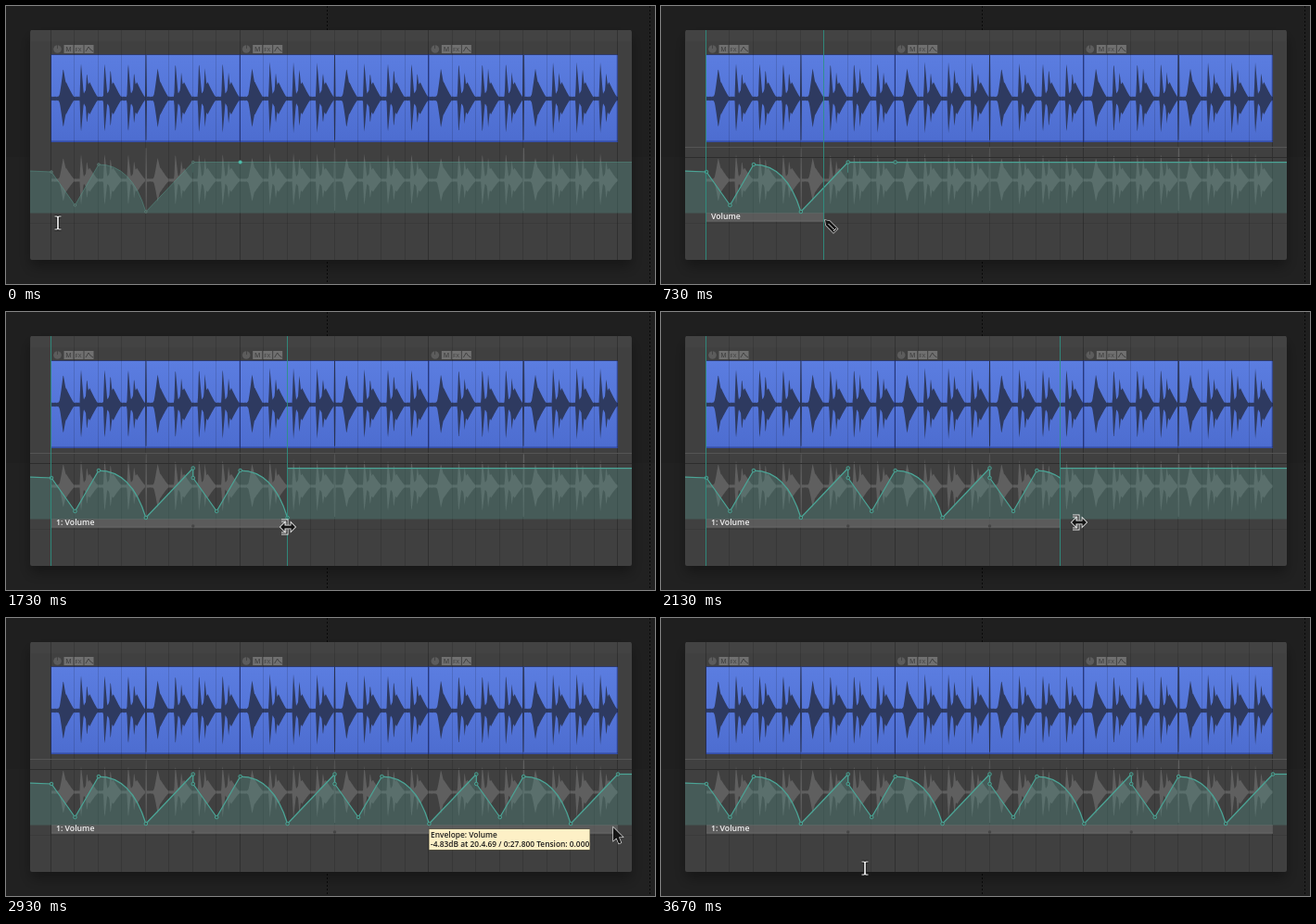
An HTML page with a canvas that plays this animation: 700 by 300 pixels, repeating every 4070 ms.

```html
<!DOCTYPE html>
<html lang="en">
<head>
<meta charset="utf-8">
<title>Automation item loop</title>
<style>
html, body { margin: 0; width: 100%; height: 100%; overflow: hidden; background: #202020; }
canvas { display: block; width: 700px; height: 300px; }
</style>
</head>
<body>
<canvas id="stage" width="700" height="300"></canvas>
<script>
const ctx = document.getElementById('stage').getContext('2d');
const LOOP = 4070, STEP = 1000 / 15;
const PANEL = { left: 26, top: 26, right: 675, bottom: 274 };
const START = 49, GRID = 25.46, ITEM = GRID * 8, CYCLE = GRID * 6, END = START + GRID * 24;
const BASE_Y = 168.5, FLOOR_Y = 223.5;
const TEAL = '#4aab9b';
const FONT = '"Open Sans", "Noto Sans", sans-serif';

// Pointer key points: time, x, y
const pointerPath = [
  [0, 56, 234], [600, 52, 232], [730, 177, 231], [870, 203, 231], [1200, 199, 229], [1530, 199, 230],
  [1730, 304, 232], [2130, 451, 227], [2670, 657, 227], [2930, 655, 226], [3400, 318, 268], [3670, 220, 270]
];

function pointerAt(t) {
  const next = pointerPath.findIndex(key => key[0] > t);
  if (next < 0) return pointerPath[pointerPath.length - 1].slice(1);
  const [t0, x0, y0] = pointerPath[next - 1], [t1, x1, y1] = pointerPath[next];
  const p = (t - t0) / (t1 - t0);
  return [x0 + (x1 - x0) * p, y0 + (y1 - y0) * p];
}

// The item's right edge follows the dragging pointer, snapped to the grid.
function itemEdge(t) {
  const [x] = pointerAt(Math.min(t, 2670));
  return START + GRID * Math.floor((x - START) / GRID + 0.15);
}

function rect(x, y, w, h, color) {
  ctx.fillStyle = color;
  ctx.fillRect(x, y, w, h);
}

function vline(x, top, bottom, color) {
  rect(Math.round(x) - 1, top, 1, bottom - top, color);
}

function dot(x, y, r, color) {
  ctx.beginPath();
  ctx.arc(x, y, r, 0, 7);
  ctx.fillStyle = color;
  ctx.fill();
}

function text(str, x, y, size, color) {
  ctx.font = `600 ${size}px ${FONT}`;
  ctx.fillStyle = color;
  ctx.fillText(str, x, y);
}

function polyline(points, { fill, stroke, width = 1, close = false }) {
  ctx.beginPath();
  points.forEach(([x, y]) => ctx.lineTo(x, y));
  if (close) ctx.closePath();
  ctx.lineWidth = width;
  ctx.strokeStyle = stroke;
  ctx.stroke();
  if (fill) {
    ctx.fillStyle = fill;
    ctx.fill();
  }
}

function clipped(left, right, draw) {
  ctx.save();
  ctx.beginPath();
  ctx.rect(left, 0, right - left, 300);
  ctx.clip();
  draw();
  ctx.restore();
}

// Each beat has a thin spike on its second quarter and a concave body on its third.
function amplitude(x) {
  const u = x % GRID, beat = Math.floor(x / GRID) % 4;
  const pulse = (at, height, rise, fall, bend) => {
    const d = u - at;
    return height * Math.max(0, 1 - (d < 0 ? -d / rise : d / fall)) ** bend;
  };
  const spike = beat ? pulse(GRID / 4, 40, 1.4, 3.4, 1) : 0;
  const peak = pulse(GRID / 2, 33 - beat % 2 * 4, beat ? 2 : 5, beat ? 4 : 7, 1.3);
  const body = pulse(GRID * 0.62, 18, 10, 10, 1.2);
  const accent = Math.abs(x % ITEM - ITEM / 2) < 0.8 ? 47 : 0;
  return Math.max(1.5 + Math.abs(Math.sin(x * 2.3)), spike, peak, body, accent);
}

function waveform(centre, scale, color) {
  const width = END - START;
  ctx.beginPath();
  for (let x = 0; x <= width; x += 0.5) ctx.lineTo(START + x, centre - amplitude(x) * scale);
  for (let x = width; x >= 0; x -= 0.5) ctx.lineTo(START + x, centre + amplitude(x) * scale * 0.95);
  ctx.fillStyle = color;
  ctx.fill();
}

function itemHeader(x) {
  dot(x + 6.5, 46.5, 4.3, '#5c5c5c');
  vline(x + 7, 42, 46, '#444');
  for (let i = 0; i < 3; i++) rect(x + 13.5 + i * 11, 42, 10, 9, '#707070');
  text('M', x + 15.3, 49.3, 7, '#424242');
  text('FX', x + 25.6, 49, 6, '#484848');
  polyline([[x + 37, 49], [x + 40, 44], [x + 42, 47], [x + 45, 49]], { stroke: '#424242' });
}

function drawBackdrop() {
  rect(0, 0, 700, 300, '#212121');
  rect(0, 0, 700, 163, '#1f1f1f');
  ctx.setLineDash([2, 2]);
  for (const x of [346.5, 694.5]) polyline([[x, 0], [x, 300]], { stroke: '#090909' });
  ctx.setLineDash([]);
  ctx.save();
  ctx.shadowColor = 'rgba(0,0,0,.3)';
  ctx.shadowBlur = 14;
  ctx.shadowOffsetY = 8;
  ctx.beginPath();
  ctx.roundRect(PANEL.left, PANEL.top, PANEL.right - PANEL.left, PANEL.bottom - PANEL.top, 2);
  ctx.fillStyle = '#404040';
  ctx.fill();
  ctx.restore();
  rect(27, 26, 647, 12, '#434343');
  rect(26, 234, 649, 1, '#3a3a3a');
}

function drawItems() {
  const blue = ctx.createLinearGradient(0, 53, 0, 147);
  blue.addColorStop(0, '#5b7de0');
  blue.addColorStop(1, '#4d6dd0');
  rect(START, 53, END - START, 94, blue);
  waveform(100, 1, '#2e3a60');
  for (let x = START; x < END - 1; x += ITEM) {
    itemHeader(x);
    ctx.strokeStyle = 'rgba(38,58,140,.6)';
    ctx.lineWidth = 1;
    ctx.strokeRect(Math.round(x) - 0.5, 52.5, ITEM, 94);
    rect(x, 145, ITEM, 1, 'rgba(38,58,140,.4)');
  }
  waveform(188, 0.74, '#5f5f5f');
}

function drawGrid() {
  for (let i = 0; i <= 24; i++) {
    vline(START + i * GRID, PANEL.top, PANEL.bottom, i % 8 ? 'rgba(0,0,0,.13)' : 'rgba(0,0,0,.24)');
  }
}

const corners = [[0, 179], [1, 215], [2, 171], [4, 222], [6, BASE_Y]];

function traceCycle(x) {
  corners.forEach(([units, y]) => {
    if (units === 4) ctx.quadraticCurveTo(x + GRID * 3.4, 171, x + GRID * 4, y);
    else ctx.lineTo(x + units * GRID, y);
  });
}

function strokeAndFill(trace, left, right, lit) {
  clipped(left, right, () => {
    ctx.beginPath();
    trace();
    ctx.lineWidth = lit ? 1.25 : 0.7;
    ctx.strokeStyle = lit ? TEAL : 'rgba(90,165,150,.65)';
    ctx.lineJoin = 'round';
    ctx.stroke();
    ctx.lineTo(right, FLOOR_Y);
    ctx.lineTo(left, FLOOR_Y);
    ctx.fillStyle = 'rgba(80,140,130,.36)';
    ctx.fill();
  });
}

function node(x, y, lit, selected) {
  dot(x, y, lit || selected ? 1.8 : 1.3, selected ? '#4fc0ae' : '#40554f');
  ctx.lineWidth = lit ? 0.9 : 0.6;
  ctx.strokeStyle = lit || selected ? TEAL : '#6a8f88';
  ctx.stroke();
}

function drawEnvelope(edge, lit) {
  const end = Math.max(edge, START + CYCLE);
  strokeAndFill(() => {
    ctx.moveTo(PANEL.left, 178);
    for (let x = START; x < END - 1; x += CYCLE) traceCycle(x);
    ctx.lineTo(PANEL.right, BASE_Y);
    ctx.lineTo(PANEL.right, FLOOR_Y);
  }, PANEL.left, end, lit);
  strokeAndFill(() => {
    ctx.moveTo(end, BASE_Y);
    ctx.lineTo(PANEL.right, BASE_Y);
  }, end, PANEL.right, lit);
  for (let x = START; x < end - 1; x += CYCLE) {
    for (const [units, y] of corners) {
      if (x + units * GRID <= end + 0.1) node(x + units * GRID, y, lit);
    }
  }
  if (end < START + ITEM - 1) node(START + ITEM, BASE_Y, lit, !lit);
}

function drawAutomationItem(edge, label) {
  if (edge <= START) return;
  rect(START, 223, edge - START, 9.5, 'rgba(108,108,108,.62)');
  rect(START, 231.5, edge - START, 1, '#666');
  for (let x = START + CYCLE; x < edge - 1; x += CYCLE) dot(x, 231, 1.7, '#454545');
  clipped(START, edge, () => text(label, 54, 230, 8.7, '#f2f2f2'));
}

function tooltip(x, y, detail) {
  rect(x - 0.5, y - 0.5, 174, 23, '#5e583f');
  rect(x, y, 173, 22, '#fdf0c6');
  text('Envelope: Volume', x + 1.5, y + 9, 8.4, '#1c1c1c');
  text(detail, x + 1.5, y + 19, 8.4, '#1c1c1c');
}

const cursors = {
  beam() {
    for (const [stroke, width] of [['#1b1b1b', 3], ['#f0f0f0', 1.2]]) {
      for (const side of [-1, 1]) {
        polyline([[3.5 * side, -7], [side, -7], [0, -6], [0, 6], [side, 7], [3.5 * side, 7]], { stroke, width });
      }
    }
  },
  pencil() {
    polyline([[0, 0], [5, 1], [13.5, 9.5], [9, 14], [0.8, 5.5]],
      { fill: '#141414', stroke: '#f0f0f0', width: 1.2, close: true });
    polyline([[3.5, 4], [10, 10.5]], { stroke: '#eee' });
    polyline([[9, 12], [12, 9]], { stroke: '#eee' });
  },
  resize() {
    const bracket = [[-7, -7], [-1, -7], [-1, 7], [-7, 7]];
    polyline(bracket, { stroke: '#eee', width: 3 });
    polyline(bracket, { stroke: '#141414', width: 1.2 });
    const half = [[-8, 0], [-3.5, -4.5], [-3.5, -1.5]];
    const top = [...half, ...half.map(([x, y]) => [-x, y]).reverse()];
    const bottom = top.map(([x, y]) => [x, -y]).reverse();
    polyline([...top, ...bottom], { fill: '#141414', stroke: '#f0f0f0', width: 1.6, close: true });
  },
  arrow() {
    polyline([[0, 0], [0, 14.5], [3.4, 11.5], [6, 17.5], [8.5, 16.4], [6, 10.5], [10.3, 10.3]],
      { fill: '#151515', stroke: '#eee', width: 1.2, close: true });
  }
};

function cursorName(t) {
  if (t < 270) return 'beam';
  if (t < 1130) return 'pencil';
  if (t < 2730) return 'resize';
  return t < 3070 ? 'arrow' : 'beam';
}

function render(t) {
  const lit = t >= 200;
  const drawing = t >= 600 && t < 1130;
  const resizing = t >= 1400 && t < 2930;
  const edge = itemEdge(t);

  drawBackdrop();
  drawItems();
  drawGrid();
  if (t >= 600) rect(26, 152, 649, 1, '#555');
  if (lit) rect(26, 163, 649, 1, '#2d2d2d');
  drawAutomationItem(edge, t < 1130 ? 'Volume' : '1: Volume');
  drawEnvelope(edge, lit);
  if (drawing || resizing) {
    for (const x of [START, edge]) vline(x, PANEL.top, PANEL.bottom, 'rgba(48,150,134,.85)');
  }
  if (t >= 1130 && t < 1400) tooltip(222, 231, '-3.88dB at 11.4.81 / 0:15.281 Tension: 0.000');
  if (t >= 2930 && t < 3000) tooltip(456.5, 228, '-4.83dB at 20.4.69 / 0:27.800 Tension: 0.000');

  ctx.save();
  ctx.translate(...pointerAt(t));
  cursors[cursorName(t)]();
  ctx.restore();
}

// Motion advances 15 steps a second, each starting on a rounded 10 ms mark.
function tick() {
  const step = Math.floor((performance.now() % LOOP + 5) / STEP);
  render(Math.round(step * STEP / 10) * 10);
  requestAnimationFrame(tick);
}
tick();
</script>
</body>
</html>
```
